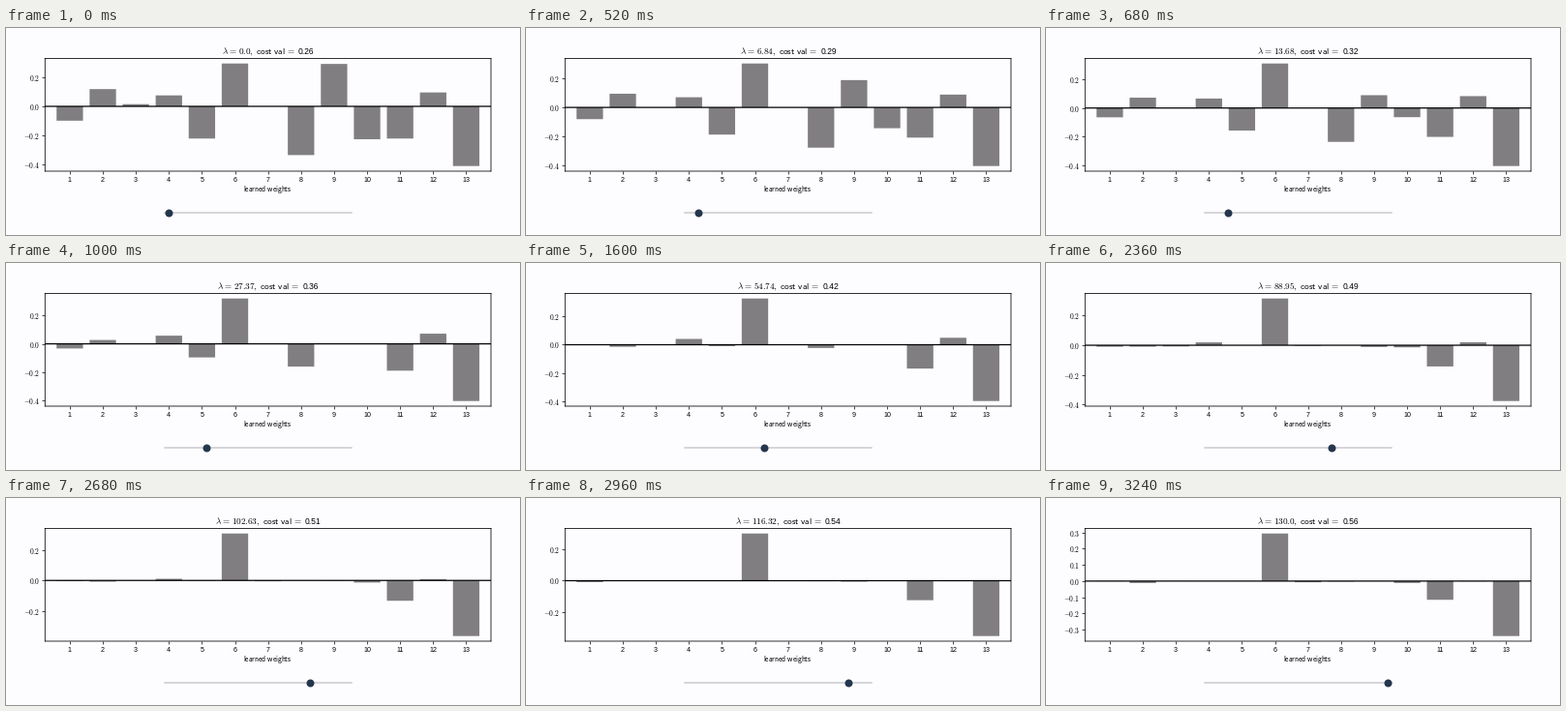
A matplotlib script that plays this animation: 531x214 px, repeating every 4000 ms.

```python
import numpy as np
import matplotlib.pyplot as plt
from matplotlib.animation import FuncAnimation

W, H, DPI = 531, 214, 72
FRAMES, INTERVAL = 100, 40
PAPER, GRAY, RAIL, NAVY = "#fdfcff", "#807e80", "#d6d6da", "#24364d"
LEFT, RIGHT, TOP, BOTTOM = 40.3, 501, 31.4, 148
LAST, LAMBDA_MAX = 19, 130
TITLE_Y = 1 - 27.4 / H

# The slider is dragged by hand: stops reached at a few moments (ms).
DRAG_TIMES = [495, 975, 1575, 1975, 2655, 3215]
DRAG_STOPS = [1, 4, 8, 11, 15, LAST]

# Unpenalised weight, and the slider stop at which it has shrunk to zero.
START = np.array([-.098, .118, .015, .075, -.22, .293, 0,
                  -.333, .29, -.225, -.22, .095, -.408])
GONE = np.array([6, 5.2, 1, 17.5, 7.1, LAST, 1, 8.7, 2.9, 2.8, 48, 16.5, 46])
POWER = np.ones(len(START))
POWER[[7, 10, 12]] = .85, .8, 2
SURVIVOR = 5

plt.rcParams.update({
    "font.family": "Liberation Sans",
    "mathtext.fontset": "cm",
    "font.size": 7.6,
    "xtick.labelsize": 7.1,
    "axes.linewidth": 0.8,
    "xtick.major.size": 2.7, "ytick.major.size": 2.7,
    "xtick.major.width": 0.7, "ytick.major.width": 0.7,
    "xtick.major.pad": 3.2, "ytick.major.pad": 2.6,
})


def stop_at(ms):
    return int(np.interp(ms, DRAG_TIMES, DRAG_STOPS, left=0))


def weights_at(stop):
    """Shrink every weight; the survivor first grows to make up for the rest."""
    w = START * np.maximum(0, 1 - (stop / GONE) ** POWER)
    w[SURVIVOR] = START[SURVIVOR] * (1 + .11 * np.sin(np.pi * (stop / LAST) ** .7))
    if stop > 6:
        residue = 0.015 * np.random.default_rng(stop).random(len(w)) ** 3
        w = np.where(w == 0, -residue, w)
    return w


def cost_at(stop):
    return .256 + .302 * (stop / LAST) ** .7


def title_at(stop):
    lam = round(LAMBDA_MAX * stop / LAST, 2)
    return (rf"$\lambda\hspace{{0.08}}=\hspace{{0.08}}{lam},\hspace{{0.33}}"
            r"\mathsf{cost\ val}\hspace{0.13}=$")


fig = plt.figure(figsize=(W / DPI, H / DPI), dpi=DPI, facecolor=PAPER)

ax = fig.add_axes([LEFT / W, 1 - BOTTOM / H, (RIGHT - LEFT) / W, (BOTTOM - TOP) / H],
                  facecolor=PAPER)
for spine in ax.spines.values():
    spine.set_snap(False)
ids = np.arange(1, len(START) + 1)
bars = ax.bar(ids, START, width=0.8, color=GRAY, linewidth=0, snap=False)
ax.axhline(0, color="black", lw=1.25, snap=False)
ax.set_xlim(0.25, 13.75)
ax.set_xticks(ids, ids)

title = fig.text(261 / W, TITLE_Y, "", size=9.2, ha="center", va="baseline")
cost = ax.annotate("", (1, TITLE_Y), xycoords=(title, "figure fraction"),
                   xytext=(3, 0), textcoords="offset points",
                   size=8.5, va="baseline", annotation_clip=False)
fig.text(270 / W, 1 - 169 / H, r"$\mathsf{learned\ weights}$",
         ha="center", va="baseline")

stage = fig.add_axes([0, 0, 1, 1])
stage.set(xlim=(0, W), ylim=(H, 0))
stage.axis("off")
stage.plot([164, 357], [191, 191], color=RAIL, lw=2, solid_capstyle="round", snap=False)
knob, = stage.plot([], [], "o", color=NAVY, ms=8, mew=0, snap=False)


def update(frame):
    stop = stop_at(frame * INTERVAL)
    weights = weights_at(stop)
    for bar, w in zip(bars, weights):
        bar.set_height(w)

    low, high = weights.min(), weights.max()
    pad = 0.05 * (high - low)
    low, high = low - pad, high + pad
    step = 0.1 if high - low < 0.7 else 0.2
    ticks = np.arange(np.ceil(low / step), np.floor(high / step) + 1) * step + 0.0
    ax.set_yticks(ticks, [f"${t:.1f}$" for t in ticks])
    ax.set_ylim(low, high)

    title.set_text(title_at(stop))
    cost.set_text(f"{cost_at(stop):.2f}")
    knob.set_data([168.3 + 9.71 * stop], [191])
    return [*bars, title, cost, knob]


anim = FuncAnimation(fig, update, frames=FRAMES, interval=INTERVAL,
                     repeat=True, repeat_delay=0, blit=False)
plt.show()
```
